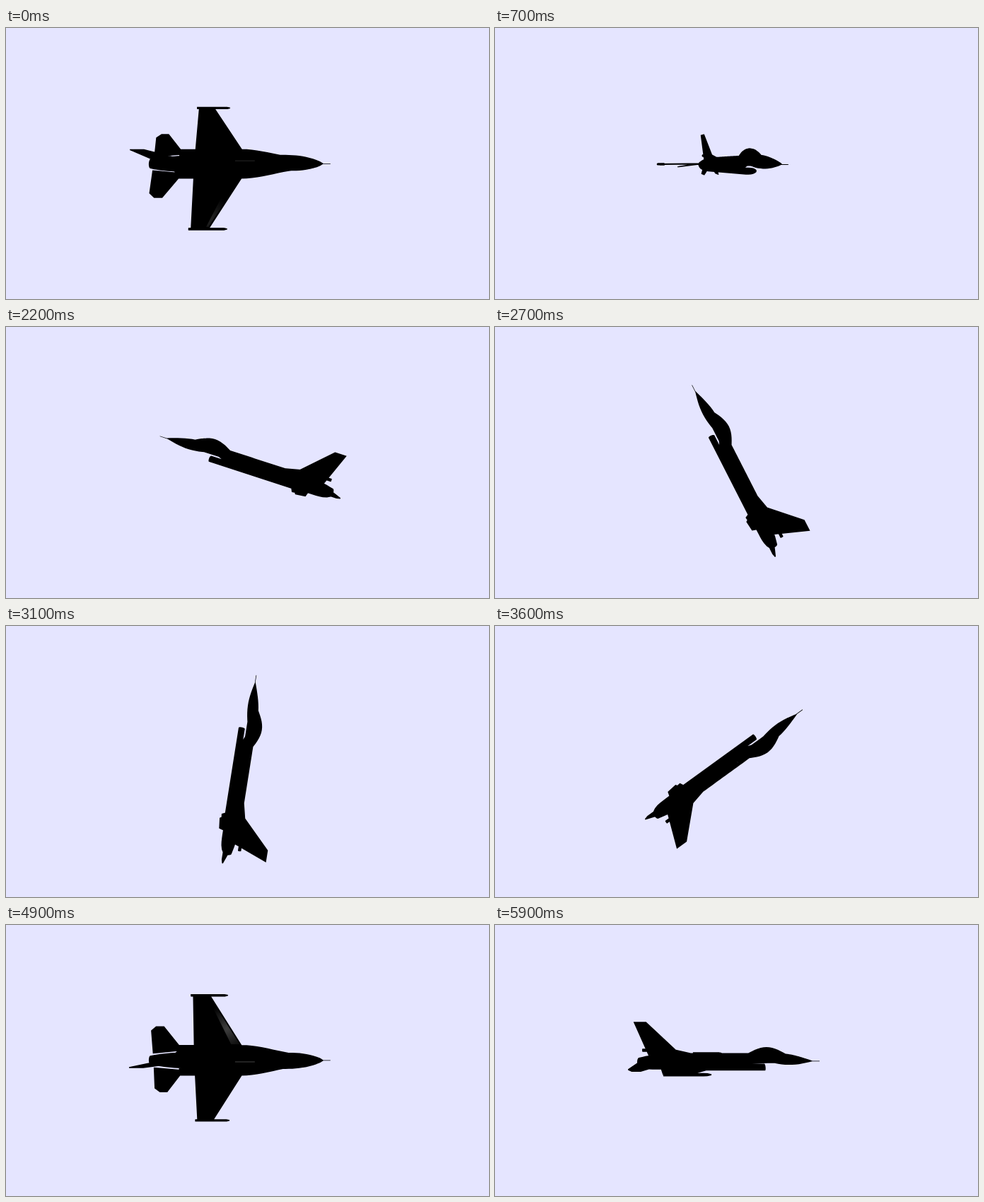
Write an HTML page with a canvas that moves like this. It is 683 px wide and 384 px high and loops after 6000 ms.

```html
<!DOCTYPE html>
<html lang="en">
<head>
<meta charset="utf-8">
<title>Jet manoeuvres</title>
<style>
  html, body { margin: 0; width: 100%; height: 100%; overflow: hidden; background: #e5e5ff; }
  canvas { display: block; }
</style>
</head>
<body>
<canvas id="stage" width="683" height="384"></canvas>
<script>
const ctx = document.getElementById('stage').getContext('2d');
const { PI, sin, cos, min, max, abs, floor } = Math;
const LOOP = 6000, STEP = 100, TURN = 2000, DEG = PI / 180;
const CAMERA = 350, PIVOT = -6;

const ramp = (from, to, u) => min(1, max(0, (u - from) / (to - from)));
const smooth = (from, to, u) => { const t = ramp(from, to, u); return t * t * (3 - 2 * t); };
const arch = (from, to, u) => sin(PI * ramp(from, to, u));

// Model space: [forward, up, right]. Every solid is a convex cloud of points.
const solids = [];

// Skins `count` elliptical sections; shape(u) gives [top, bottom, halfWidth].
function loft(from, to, count, shape, side = 0) {
  let last;
  for (let i = 0; i <= count; i++) {
    const u = from + (to - from) * i / count;
    const [top, bottom, half] = shape(u);
    const ring = Array.from({ length: 20 }, (_, k) => {
      const a = k * PI / 10;
      return [u, (top + bottom) / 2 + (top - bottom) / 2 * sin(a), side + half * cos(a)];
    });
    if (last) solids.push([...last, ...ring]);
    last = ring;
  }
}

// Thickens a flat outline by `t` on both sides along one axis.
function slab(points, axis, t) {
  solids.push([-t, t].flatMap(d => points.map(p => p.map((c, i) => i === axis ? c + d : c))));
}

// Lays a [forward, right] outline on one side, drooping outward from the root.
function surface(outline, side, root, droop, t) {
  slab(outline.map(([u, w]) => [u, (root - w) * droop, w * side]), 1, t);
}

function buildJet() {
  const nose = (u, power) => sin(PI / 2 * ramp(107.5, 57.5, u) ** power);
  const tail = u => ramp(-85, -138, u);

  // Probe, fuselage, canopy, intake, strakes, parachute stub
  loft(117.5, 106, 1, () => [-.6, -1.3, .35]);
  loft(107.5, -138, 50, u => [
    -.5 + 11 * nose(u, 1) - 6.5 * tail(u) ** 2,
    -1 - 5 * arch(107.5, 42, u) - 12 * smooth(40, 0, u) + 5 * tail(u) ** 8,
    .3 + 11.2 * nose(u, .75) - 5 * tail(u) ** 2]);
  loft(70, 14, 14, u => [9 + 10 * arch(70, 14, u), 3, 2 + 5 * arch(70, 14, u)]);
  loft(40, -92, 1, () => [-5, -14, 12]);
  loft(80, -97, 24, u => [2, -3, 9 + 13 * smooth(80, -8, u)]);
  loft(-132, -118, 1, () => [16.8, 12.3, 1.5]);

  // Tail fin with its dorsal fillet
  slab([[-142, 54, 0], [-125, 54, 0], [-85, 15, 0], [-85, 5, 0], [-123, 5, 0]], 2, .6);
  slab([[-86, 15.5, 0], [-60, 9.5, 0], [-86, 5, 0]], 2, .6);

  for (const side of [-1, 1]) {
    surface([[-75, 18], [-74, 89], [-50, 89], [-7, 20]], side, 18, .014, .9);
    loft(-26.5, -77, 12, u => {
      const r = .6 + 1.1 * ramp(-26.5, -31, u);
      return [r - 1, -r - 1, r];
    }, 89.8 * side);
    surface([[-133, 10], [-135.5, 42], [-128.5, 48], [-117.5, 48], [-90, 14]], side, 10, .155, .6);
    slab([[-82, -11, 9 * side], [-87, -19.5, 13 * side], [-101, -18, 13 * side], [-105, -9, 9 * side]], 2, .5);
  }
}

// Yaw half a turn, loop half a turn, roll half a turn; the first pose is a roll on its own.
function pose(time) {
  const turn = time % TURN / TURN * PI;
  const c = cos(turn), s = sin(turn);
  if (time < STEP || time >= 2 * TURN) {
    const roll = time < STEP ? 18 * DEG : turn - PI / 2;
    const rc = cos(roll), rs = sin(roll);
    return { roll, place: ([u, v, w]) => [u, v * rs - w * rc, v * rc + w * rs] };
  }
  if (time < TURN) return { place: ([u, v, w]) => [u * c - w * s, v, u * s + w * c] };
  return { place: ([u, v, w]) => [v * s - u * c, u * s + v * c, -w] };
}

function hull(points) {
  points.sort((a, b) => a[0] - b[0] || a[1] - b[1]);
  const half = list => {
    const out = [];
    for (const p of list) {
      while (out.length > 1) {
        const [a, b] = out.slice(-2);
        if ((b[0] - a[0]) * (p[1] - a[1]) > (b[1] - a[1]) * (p[0] - a[0])) break;
        out.pop();
      }
      out.push(p);
    }
    return out.slice(0, -1);
  };
  return [...half(points), ...half(points.slice().reverse())];
}

function trace(points) {
  points.forEach(([x, y], i) => i ? ctx.lineTo(x, y) : ctx.moveTo(x, y));
}

// Dim reflections on the nearer wing and the spine while the top faces the viewer
function sheen(roll, project) {
  const strength = max(0, cos(roll) - .9) * 6;
  if (!strength) return;
  const side = roll < 0 ? -1 : 1;
  const along = ramp(4, 20, abs(roll) / DEG);
  const [x, y] = project([-17 - 38 * along, 0, side * (27 + 56 * along)]);
  const glow = ctx.createRadialGradient(x, y, 0, x, y, 34);
  glow.addColorStop(0, `rgba(120,120,120,${strength})`);
  glow.addColorStop(1, 'rgba(120,120,120,0)');
  ctx.fillStyle = glow;
  ctx.beginPath();
  trace([[-54, 87], [-51, 87], [-11, 23], [-23, 23]].map(([u, w]) => project([u, 0, w * side])));
  ctx.fill();

  ctx.strokeStyle = `rgba(130,130,130,${strength})`;
  ctx.beginPath();
  trace([project([-17, 12, 0]), project([10, 12, 0])]);
  ctx.stroke();
}

function draw(time) {
  const { roll, place } = pose(time);
  const project = ([u, v, w]) => {
    const [x, y, z] = place([u - PIVOT, v, w]);
    const k = CAMERA / (CAMERA - z);
    return [341.5 + (x + PIVOT) * k, 192 - y * k];
  };
  ctx.fillStyle = '#e5e5ff';
  ctx.fillRect(0, 0, 683, 384);
  ctx.fillStyle = '#000';
  ctx.beginPath();
  for (const solid of solids) {
    trace(hull(solid.map(project)));
    ctx.closePath();
  }
  ctx.fill();
  if (roll !== undefined) sheen(roll, project);
}

buildJet();
const start = performance.now();
function tick() {
  const time = (performance.now() - start) % LOOP;
  draw(floor(time / STEP) * STEP);
  requestAnimationFrame(tick);
}
tick();
</script>
</body>
</html>
```
